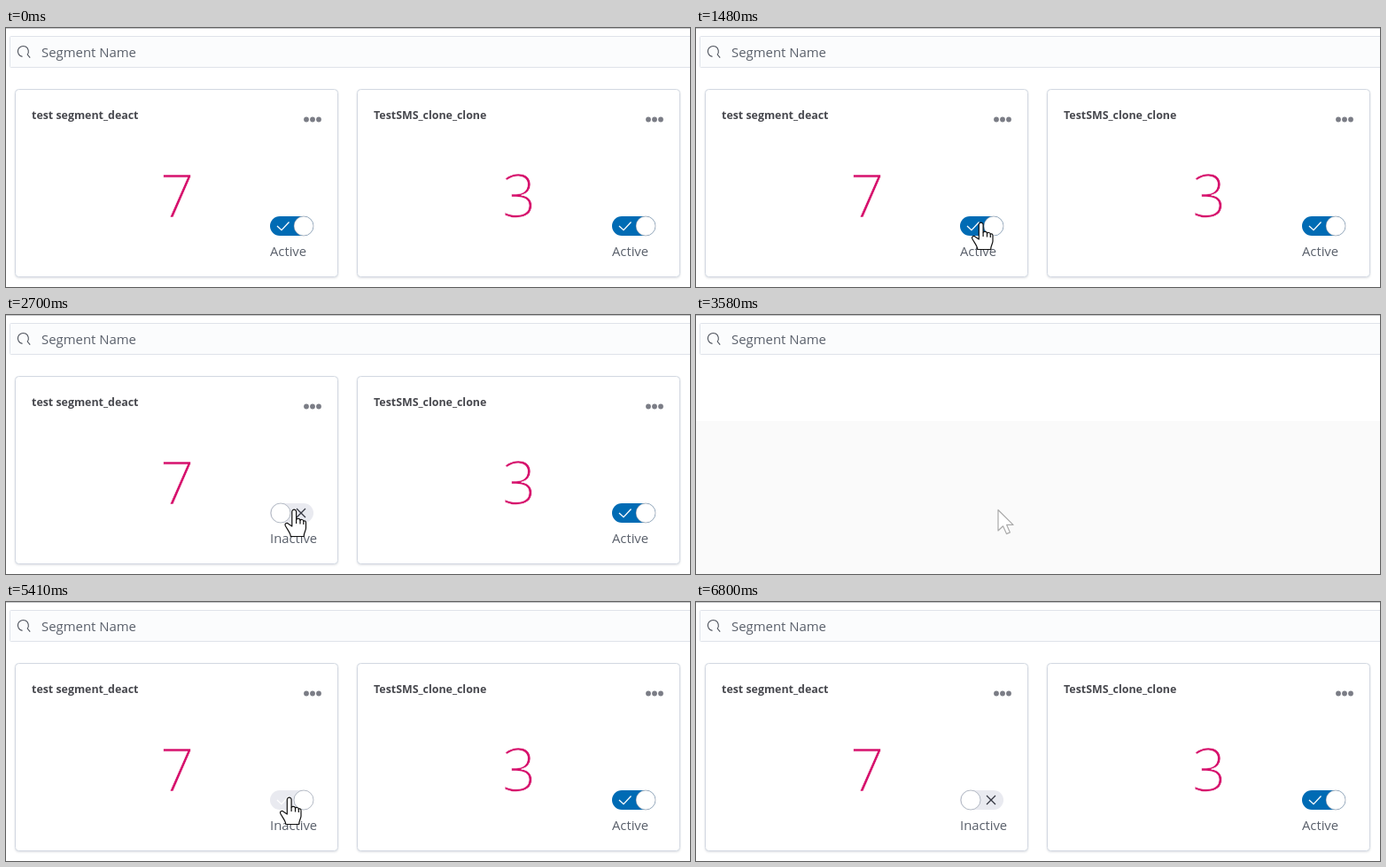
Animation, 772 px wide and 293 px high, one loop 8460 ms. Source, as an HTML page:

```html
<!DOCTYPE html>
<html lang="en">
<head>
<meta charset="utf-8">
<title>Segment toggles</title>
<style>
  html, body { margin: 0; width: 100%; height: 100%; overflow: hidden; background: #fff; }
  svg { display: block; width: 772px; height: 293px; font-family: "Open Sans", "Noto Sans", sans-serif; }
  .search { font-size: 14.9px; fill: #5a606b; }
  .title { font-size: 12.4px; font-weight: 700; fill: #46474d; }
  .count { font-size: 67px; font-weight: 300; fill: #d6106c; stroke: #fff; stroke-width: .7px; text-anchor: middle; }
  .label { font-size: 14.8px; fill: #5a606b; }
  .card { fill: #fff; stroke: #d3d8e2; filter: drop-shadow(0 1px 1px rgba(90, 100, 120, .2)); }
  .dots { fill: #7b7d86; }
  .knob { fill: #fff; stroke: rgba(110, 122, 142, .5); }
  .check, .cross { fill: none; stroke: #fff; stroke-width: 1.3px; }
  .cross { stroke: #343741; }
  .icon { fill: none; stroke: #4d525c; stroke-width: 1.1px; }
  .cursor { fill: #fff; stroke: #111; stroke-width: 1.2px; stroke-linejoin: round; }
</style>
</head>
<body>
<svg viewBox="0 0 772 293">
  <defs>
    <clipPath id="pillClip"><rect x="297" y="212" width="51" height="24" rx="12"/></clipPath>
  </defs>
  <rect width="772" height="1" fill="#c6c7ca"/>
  <rect x="4.5" y="9.5" width="790" height="35" rx="1" fill="#fbfcfd" stroke="#dfe3ea"/>
  <path class="icon" d="M18.5 32.4A6 6 0 1 1 24.2 30L27.2 33.6"/>
  <text class="search" x="40" y="33">Segment Name</text>
  <g id="cards"></g>
  <g id="blank">
    <rect y="46" width="772" height="74" fill="#fff"/>
    <rect y="120" width="772" height="173" fill="#fafafa"/>
  </g>
  <g id="cursor" class="cursor">
    <path id="arrow" d="M0 .5V24L5.5 18.8L9.5 27.6L13.4 25.9L9.7 17.4H17Z"/>
    <g id="hand">
      <path d="M-2.7 19V2.6a2.4 2.4 0 0 1 4.8 0V11.5c.5-1.5 4-1.5 4.4.6 .8-1 3.5-.9 3.8 1 1.2-.8 2.7 0 2.7 2V21c0 3-2.3 5-2.3 9.5H-4.2C-4.2 27-7 24-10.2 18.5c-1.3-2.3 1.6-4.2 3.4-2.3Z"/>
      <path fill="none" d="M2.1 11.5V16M6.5 12.1V16.5M10.3 13.1V17"/>
    </g>
  </g>
</svg>
<script>
const LOOP = 8460;
const STEP = 69;        // the picture moves in steps of this many ms
const SLIDE = 350;      // time a switch takes to slide
const TRAVEL = 26;      // distance a knob slides
const MOUNTED = 6 / 26; // how far a reloaded switch has already slid

// Each click on the left switch empties the list, which then comes back.
const reloads = [
  { click: 1550, empty: 1880, back: 2350 },
  { click: 3440, empty: 3580, back: 3910 },
  { click: 5410, empty: 5550, back: 5810 }
];

// Cursor moves: start, end, and where each one leads.
const moves = [
  { from: 581, to: 930, x: 367, y: 213 },
  { from: 930, to: 1480, x: 322, y: 220 },
  { from: 1811, to: 1950, x: 298, y: 213 },
  { from: 2080, to: 2350, x: 325.5, y: 220 },
  { from: 2890, to: 3110, x: 341, y: 220 },
  { from: 4260, to: 4460, x: 336, y: 221 },
  { from: 4720, to: 5140, x: 320, y: 221 },
  { from: 6310, to: 6800, x: 400, y: 302 }
];

const $ = (selector, root = document) => root.querySelector(selector);
const mix = (a, b, p) => a + (b - a) * p;
const show = (element, visible) => element.setAttribute("opacity", visible ? 1 : 0);
const shift = (element, x, y = 0) => element.setAttribute("transform", `translate(${x} ${y})`);

function progress(t, from, to) {
  if (t >= to) return 1;
  return Math.max(0, Math.floor((t - from) / STEP) * STEP / (to - from));
}

const card = (id, x, title, count) => `
  <g id="${id}" transform="translate(${x})">
    <rect class="card" x="10.5" y="69.5" width="364" height="212" rx="4"/>
    <text class="title" x="29" y="103">${title}</text>
    <g class="dots">${[-7, 0, 7].map(dx => `<circle cx="${346 + dx}" cy="103.5" r="2.9"/>`).join("")}</g>
    <text class="count" x="193" y="214.3">${count}</text>
    <rect class="pill" x="298" y="213" width="49" height="22" rx="11"/>
    <g clip-path="url(#pillClip)">
      <g class="strip">
        <path class="check" d="M280 224L285 228.7L293.5 219.5"/>
        <circle class="knob" cx="310" cy="224" r="11"/>
        <path class="cross" d="M328 219L338 229M338 219L328 229"/>
      </g>
    </g>
    <text class="label" x="298" y="258"></text>
  </g>`;

$("#cards").innerHTML =
  card("left", 0, "test segment_deact", 7) +
  card("right", 386, "TestSMS_clone_clone", 3);

function drawSwitch(id, on, position) {
  const root = $(id);
  $(".pill", root).setAttribute("fill", on ? "#006bb4" : "#e9eaf0");
  $(".label", root).textContent = on ? "Active" : "Inactive";
  shift($(".strip", root), TRAVEL * position);
}

function drawSwitches(t) {
  const past = reloads.filter(({ click }) => t >= click);
  const last = past.at(-1);
  const leftOn = past.length % 2 === 0;
  const reloaded = reloads.findLast(({ back }) => t >= back);
  const mounted = reloaded ? mix(MOUNTED, 1, progress(t, reloaded.back, reloaded.back + SLIDE)) : 1;

  let left = leftOn ? mounted : 0;
  if (last && last !== reloaded) {
    const slid = progress(t, last.click, last.click + SLIDE);
    left = leftOn ? slid : 1 - slid;
  }
  drawSwitch("#left", leftOn, left);
  drawSwitch("#right", true, mounted);
}

function drawCursor(t, empty) {
  let x = 440, y = 300;
  for (const move of moves) {
    const p = progress(t, move.from, move.to);
    x = mix(x, move.x, p);
    y = mix(y, move.y, p);
  }
  const overSwitch = !empty && Math.abs(x - 322.5) < 26 && Math.abs(y - 224) < 13;
  shift($("#cursor"), x, y);
  show($("#hand"), overSwitch);
  show($("#arrow"), !overSwitch);
  $("#arrow").setAttribute("stroke", empty ? "#aaa" : "#111");
}

function render(t) {
  const empty = reloads.some(reload => t >= reload.empty && t < reload.back);
  show($("#blank"), empty);
  drawSwitches(t);
  drawCursor(t, empty);
}

const start = performance.now();
function tick() {
  render((performance.now() - start) % LOOP);
  requestAnimationFrame(tick);
}
tick();
</script>
</body>
</html>
```
